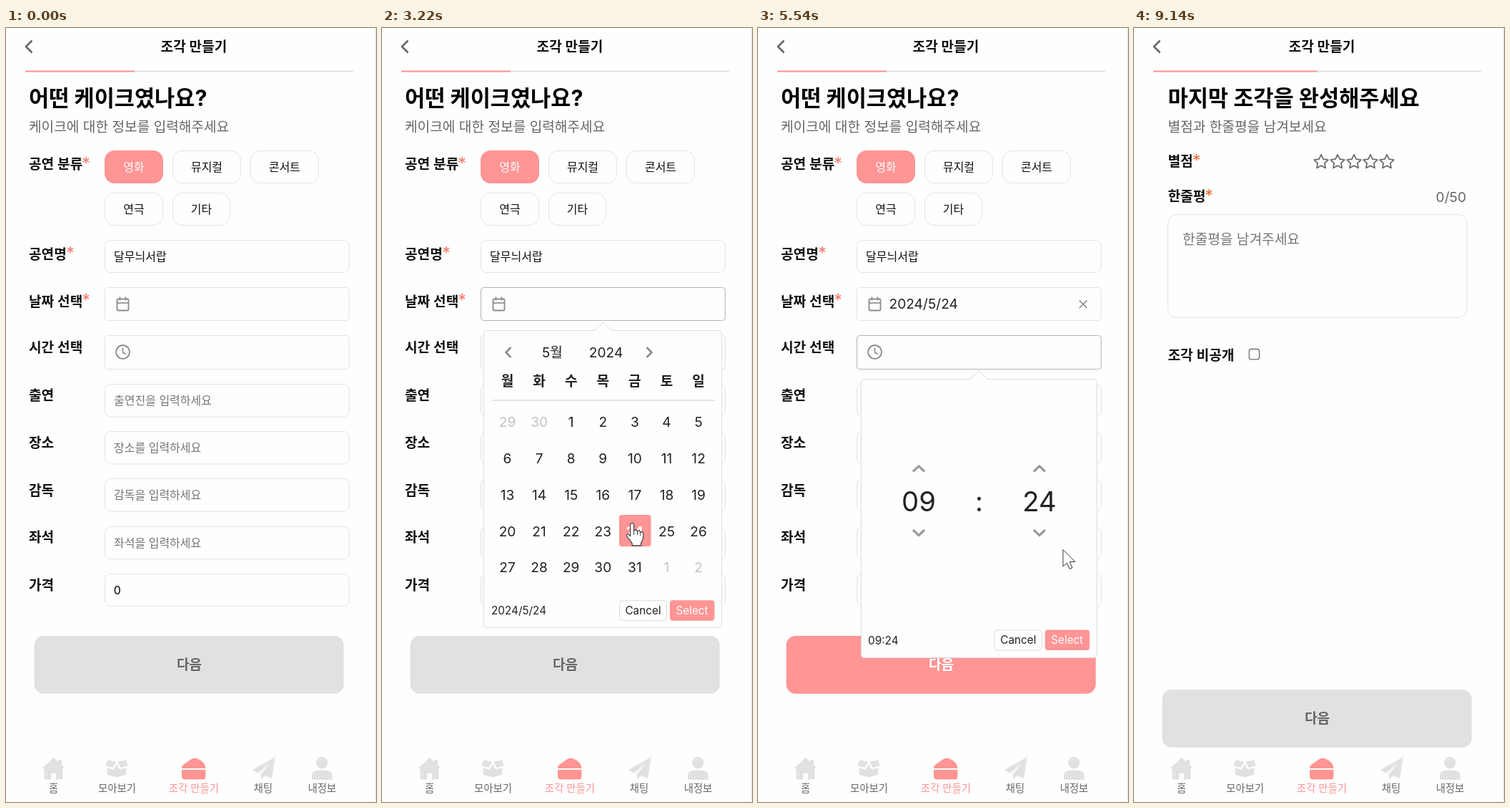
An HTML page with a canvas for the animation above (9210 ms loop, 518 px wide and 1081 px high).

```html
<!DOCTYPE html>
<html lang="ko">
<head>
<meta charset="utf-8">
<title>조각 만들기</title>
<style>
html, body { margin: 0; width: 100%; height: 100%; overflow: hidden; background: #fdfefe; }
canvas { display: block; width: 518px; height: 1081px; }
</style>
</head>
<body>
<canvas id="stage"></canvas>
<script>
const W = 518, H = 1081, LOOP = 9210;
const BG = '#fdfefe', PINK = '#ff9594', LINE = '#e2e4e4', GREY = '#e1e1e1', MID = '#666', ICON = '#8c8c8c', INK = '#111';
const FONT = "Inter, 'Noto Sans CJK KR', 'Noto Sans CJK', sans-serif";
const TITLE = 30.6, BODY = 19.15, FIELD = 16, SMALL = 15.3, TAB = 14.4;
const canvas = document.getElementById('stage');
const c = canvas.getContext('2d');
const dpr = window.devicePixelRatio || 1;
canvas.width = W * dpr;
canvas.height = H * dpr;

const clamp = v => Math.max(0, Math.min(1, v));
const easeOut = p => 1 - (1 - p) ** 2;
const smooth = p => p * p * (3 - 2 * p);
const ramp = (t, start, span) => clamp((t - start) / span);
const mix = (a, b, p) => `rgb(${a.map((v, i) => Math.round(v + (b[i] - v) * p))})`;

// y is the visual middle of the glyphs
function text(s, x, y, size, { color = INK, weight = 400, align = 'left' } = {}) {
  c.font = `${weight} ${size}px ${FONT}`;
  c.textAlign = align;
  c.fillStyle = color;
  c.fillText(s, x, y + 0.36 * size);
}

function box(x, y, w, h, r, fill, stroke, width = 1) {
  c.beginPath();
  c.roundRect(x, y, w, h, r);
  if (fill) { c.fillStyle = fill; c.fill(); }
  if (stroke) { c.strokeStyle = stroke; c.lineWidth = width; c.stroke(); }
}

function line(points, color, width) {
  c.beginPath();
  points.forEach(([x, y]) => c.lineTo(x, y));
  c.strokeStyle = color;
  c.lineWidth = width;
  c.stroke();
}

function shape(d, fill, stroke, width = 1) {
  const p = new Path2D(d);
  if (fill) { c.fillStyle = fill; c.fill(p); }
  if (stroke) { c.strokeStyle = stroke; c.lineWidth = width; c.stroke(p); }
}

function star(x, y) {
  c.beginPath();
  for (let i = 0; i < 10; i++) {
    const a = -Math.PI / 2 + i * Math.PI / 5, r = i % 2 ? 5.1 : 10.3;
    c.lineTo(x + r * Math.cos(a), y + r * Math.sin(a));
  }
  c.closePath();
  c.strokeStyle = MID;
  c.lineWidth = 1.7;
  c.stroke();
}

const required = (x, y, color) => text('*', x, y + 3.9, 23, { color, align: 'center' });
const label = (s, x, y) => text(s, x, y, BODY, { weight: 600 });

function header(progress) {
  line([[36.5, 17.5], [28, 26], [36.5, 34.5]], MID, 2.5);
  text('조각 만들기', 263, 26, BODY, { weight: 600, align: 'center' });
  c.fillStyle = '#dfe2e1';
  c.fillRect(27, 59.5, 459, 2);
  c.fillStyle = PINK;
  c.fillRect(27, 59.5, progress, 2);
}

function heading(title, sub, x) {
  text(title, x, 98, TITLE, { weight: 700, color: '#000' });
  text(sub, x, 138, BODY, { color: MID });
}

function nextButton(y, on) {
  box(39.6, y, 433.2, 80.8, 13, on ? PINK : GREY);
  text('다음', 256.5, y + 40, BODY, { weight: 600, color: on ? '#fff' : MID, align: 'center' });
}

function nav() {
  shape('M66.5 1019 L73.5 1025.2 V1022 H78 V1029.3 L83.5 1034.5 H79.5 V1047 Q79.5 1049.5 77 1049.5 H70 V1041 H63 V1049.5 H56 Q53.5 1049.5 53.5 1047 V1034.5 H50 Z', GREY);
  shape('M142 1022.5 L154 1024.5 L149.5 1033 L139 1030.5 Z M168 1022.5 L156 1024.5 L160.5 1033 L171 1030.5 Z M142 1033.5 L151 1035.5 L155 1028 L159 1035.5 L168 1033.5 V1043 L155 1046.5 L142 1043 Z', GREY);
  shape('M246 1034 Q246 1030.5 249 1028.5 L260 1020.8 Q264 1018.5 269 1021 Q279 1025.5 279.5 1034 Z M246 1036 H279.5 V1045 Q279.5 1049.5 275 1049.5 H250.5 Q246 1049.5 246 1045 Z', PINK);
  shape('M377 1018 L344.5 1036.5 L353.5 1040.5 L370.5 1025 L357 1042 V1050 L362 1044.5 L372 1048 Z', GREY);
  shape('M450.5 1026.3 A8.2 8.2 0 1 1 434.1 1026.3 A8.2 8.2 0 1 1 450.5 1026.3 Z M428 1050 V1046 Q428 1037 437 1037 H448 Q457 1037 457 1046 V1050 Z', GREY);
  [['홈', 66.5], ['모아보기', 155.5], ['조각 만들기', 263], ['채팅', 360], ['내정보', 442.5]].forEach(([s, x], i) =>
    text(s, x, 1062, TAB, { weight: 500, color: i === 2 ? PINK : MID, align: 'center' }));
}

const chips = [['영화', 138, 171, 82], ['뮤지컬', 233, 171, 96], ['콘서트', 342, 171, 96], ['연극', 138, 230, 82], ['기타', 233, 230, 81]];
const picks = [[-1000, 0], [780, 1], [1350, 2], [1840, 0]];

function chipLevel(i, t) {
  let level = 0;
  for (const [at, id] of picks) {
    if (t < at) break;
    const p = easeOut(ramp(t, at, 300));
    level += ((id === i ? 1 : 0) - level) * p;
  }
  return level;
}

function drawChips(t) {
  chips.forEach(([s, x, y, w], i) => {
    const k = chipLevel(i, t);
    box(x + .5, y + .5, w - 1, 45, 13, mix([253, 254, 254], [255, 149, 148], k), mix([226, 228, 228], [255, 149, 148], k));
    text(s, x + w / 2, y + 23.5, FIELD, { color: mix([17, 17, 17], [255, 255, 255], k), align: 'center' });
  });
}

function clearMark(y) {
  line([[450, y - 5.5], [460.5, y + 5]], ICON, 1.7);
  line([[460.5, y - 5.5], [450, y + 5]], ICON, 1.7);
}

function priceField(t) {
  const focus = t >= 6680 && t < 8400;
  const digits = Math.floor((t - 7000) / 90) + 1;
  const value = digits < 1 ? '0' : '10000'.slice(0, digits);
  box(138.5, 762.5, 342, 45, 8, null, focus ? null : LINE);
  if (focus) {
    shape('M481 761.5 H146 Q137.5 761.5 137.5 770 V800 Q137.5 808.5 146 808.5 H481', null, PINK, 1.2);
    box(459, 775, 17.5, 20.5, 0, '#efefef');
    shape('M463 783 L468 778 L473 783 Z M463 787 L468 792 L473 787 Z', '#505050');
  }
  text(value, 150.8, 785, FIELD, { color: '#000' });
}

function form(t) {
  header(153);
  heading('어떤 케이크였나요?', '케이크에 대한 정보를 입력해주세요', 32);
  [['공연 분류', 190], ['공연명', 316], ['날짜 선택', 382], ['시간 선택', 446], ['출연', 513], ['장소', 579], ['감독', 646], ['좌석', 711], ['가격', 778]]
    .forEach(([s, y]) => label(s, 32, y));
  [[112, 185], [90, 310], [112, 376]].forEach(([x, y]) => required(x, y, '#f9776a'));
  drawChips(t);

  box(138.5, 296.5, 342, 45, 8, null, LINE);
  text('달무늬서랍', 151, 319, FIELD);

  box(138.5, 362.5, 342, 46, 4, null, t >= 2330 && t < 4600 ? '#b3b5b5' : LINE);
  box(155.5, 378.5, 16, 16, 2, null, ICON, 1.8);
  line([[155, 384], [172, 384]], ICON, 1.7);
  line([[159.5, 375.5], [159.5, 380.5]], ICON, 1.8);
  line([[167.5, 375.5], [167.5, 380.5]], ICON, 1.8);
  if (t >= 4510) {
    text('2024/5/24', 183.5, 385.5, BODY, { color: '#222' });
    clearMark(386);
  }

  box(138.5, 429.5, 342, 47, 4, null, t >= 5150 && t < 6250 ? '#b3b5b5' : LINE);
  c.beginPath();
  c.arc(163.5, 452.5, 9.5, 0, 7);
  c.strokeStyle = ICON;
  c.lineWidth = 1.9;
  c.stroke();
  line([[163.5, 446.5], [163.5, 453], [168, 455.5]], ICON, 1.7);
  if (t >= 6200) {
    text('09:24', 183.5, 453, BODY, { color: '#222' });
    clearMark(454);
  }

  [['출연진을', 497.5], ['장소를', 563.5], ['감독을', 629.5], ['좌석을', 696.5]].forEach(([s, y]) => {
    box(138.5, y, 342, 45.5, 8, null, LINE);
    text(s + ' 입력하세요', 151, y + 22.8, FIELD, { color: '#757575' });
  });
  priceField(t);
  nextButton(849, t >= 4510);
  nav();
  popup(t, 2560, 4520, calendar);
  popup(t, 5220, 6200, clock);
}

function popup(t, open, close, draw) {
  const a = ramp(t, open, 140) * (1 - ramp(t, close, 140));
  if (!a) return;
  c.save();
  c.globalAlpha = a;
  draw();
  c.restore();
}

function panel(x, y, w, h) {
  box(x, y, w, h, 4, BG, '#dcdede');
  shape(`M297 ${y + 1} L309.5 ${y - 11} L322 ${y + 1}`, BG);
  shape(`M297 ${y} L309.5 ${y - 11} L322 ${y}`, null, '#dcdede');
}

function footer(s, x, right, y) {
  text(s, x, y, SMALL, { color: '#222' });
  box(right - 133, y - 14, 66, 28, 4, null, '#dcdede');
  text('Cancel', right - 100, y - .5, SMALL, { color: '#222', align: 'center' });
  box(right - 62.5, y - 14.5, 62.5, 28.5, 4, PINK);
  text('Select', right - 31.5, y - .5, SMALL, { color: '#fff', align: 'center' });
}

function calendar() {
  panel(142.5, 422.5, 333, 415);
  line([[180.5, 446], [173.5, 453], [180.5, 460]], ICON, 2.6);
  line([[370.5, 446], [377.5, 453], [370.5, 460]], ICON, 2.6);
  text('5월', 238.5, 453, BODY, { color: '#222', align: 'center' });
  text('2024', 313.5, 453, BODY, { color: '#222', align: 'center' });
  const col = i => 175.5 + i * 44.6;
  [...'월화수목금토일'].forEach((s, i) => text(s, col(i), 493, BODY, { weight: 600, color: '#222', align: 'center' }));
  line([[154, 520], [466, 520]], '#dcd9da', 1.6);
  box(332, 680, 44.6, 44.2, 4, PINK);
  for (let i = 0; i < 35; i++) {
    const day = i - 1, inside = day > 0 && day < 32, chosen = day === 24;
    text(String(day < 1 ? day + 30 : inside ? day : day - 31), col(i % 7), 550 + 50.9 * Math.floor(i / 7), BODY, {
      color: chosen ? '#fff' : inside ? '#222' : '#c0c2c5', weight: chosen ? 700 : 400, align: 'center'
    });
  }
  footer('2024/5/24', 153, 465.5, 813.7);
}

function clock() {
  panel(144.5, 490.5, 330, 389);
  for (const x of [225, 394]) {
    line([[x - 8, 619.5], [x, 611.8], [x + 8, 619.5]], '#9a9a9a', 3.2);
    line([[x - 8, 701], [x, 708.7], [x + 8, 701]], '#9a9a9a', 3.2);
  }
  [['09', 225], [':', 309.5], ['24', 394]].forEach(([s, x]) => text(s, x, 661, 2 * BODY, { color: '#222', align: 'center' }));
  footer('09:24', 154, 464.3, 855);
}

function review(t) {
  header(153 + 76.5 * smooth(ramp(t, 8500, 520)));
  heading('마지막 조각을 완성해주세요', '별점과 한줄평을 남겨보세요', 47.5);
  label('별점', 47.5, 186);
  required(87.5, 181, '#ea6a3c');
  for (let i = 0; i < 5; i++) star(262 + 23 * i, 187.2);
  label('한줄평', 47.5, 235);
  required(105, 230, '#ea6a3c');
  text('0/50', 465, 236, BODY, { color: MID, align: 'right' });
  box(47.5, 260.5, 418.5, 144, 12, null, LINE);
  text('한줄평을 남겨주세요', 68, 295, BODY, { color: '#757575' });
  label('조각 비공개', 47.5, 457);
  box(161.2, 448.5, 14.3, 14.3, 3, '#fff', '#707070', 1.3);
  nextButton(924, false);
  nav();
}

// time, x, y, pointer kind until the next point
const path = [
  [90, 345, 700, 'beam'], [300, 343, 640, 'beam'], [420, 341, 500, 'arrow'], [560, 338, 340, 'arrow'],
  [680, 322, 215, 'hand'], [850, 324, 200, 'hand'], [1000, 327, 189, 'hand'], [1150, 350, 176, 'hand'],
  [1330, 392, 194, 'hand'], [1500, 390, 198, 'hand'], [1780, 197, 200, 'hand'], [1900, 198, 206, 'hand'],
  [2020, 207, 256, 'hand'], [2070, 212, 300, 'beam'], [2120, 216, 343, 'beam'], [2300, 228, 392, 'beam'],
  [2420, 232, 402, 'beam'], [2560, 240, 385, 'arrow'], [2750, 290, 460, 'hand'], [3200, 350, 690, 'hand'],
  [3520, 353, 704, 'hand'], [3900, 356, 707, 'hand'], [4250, 430, 812, 'hand'], [4440, 441, 821, 'hand'],
  [4600, 441, 820, 'arrow'], [4800, 400, 640, 'arrow'], [5000, 340, 456, 'beam'], [5220, 340, 454, 'arrow'],
  [5400, 410, 650, 'arrow'], [5540, 427, 728, 'arrow'], [5740, 431, 845, 'hand'], [6000, 435, 860, 'hand'],
  [6220, 434, 857, 'arrow'], [6440, 410, 790, 'beam'], [6680, 220, 786, 'beam'], [6900, 25, 786, 'beam'],
  [7250, 25, 788, 'beam'], [7420, 72, 799, 'arrow'], [7520, 150, 930, 'arrow'], [7600, 238, 1058, 'hand'],
  [7620, 240, 1062, 'hand'], [7760, 262, 1020, 'arrow'], [7980, 300, 920, 'hand'], [8120, 303, 905, 'hand'],
  [8500, 303, 905, 'arrow'], [9090, 303, 905, 'arrow']
];

const pointers = {
  hand() {
    shape('M-2.5 2.2 Q0 -1.5 2.5 2.2 V11 Q6 8.5 7.3 11.8 Q10.2 10 11.6 13 Q15.5 11.8 15.7 16 Q15.7 24 12.5 28 V32 H0 V29 Q-3 23.5 -7.2 19.5 Q-8.6 15.5 -5.2 16 L-2.5 19 Z', '#fff', '#333', 1.1);
    shape('M2.5 11 V17 M7.3 12 V17 M11.6 13 V18', null, '#333', 1);
  },
  arrow() {
    shape('M0 0 V23.5 L5.5 18.5 L9.3 27 L13 25.3 L9.3 17 H17 Z', '#fff', '#333', 1);
  },
  beam() {
    shape('M-7 -12 H-2 Q0 -12 0 -10 Q0 -12 2 -12 H7 M0 -11 V11 M-7 12 H-2 Q0 12 0 10 Q0 12 2 12 H7', null, '#111', 2);
  }
};

function pointer(t) {
  const i = path.findIndex(([at], n) => t >= at && n + 1 < path.length && t < path[n + 1][0]);
  if (i < 0) return;
  const [t0, x0, y0, kind] = path[i], [t1, x1, y1] = path[i + 1];
  const p = (t - t0) / (t1 - t0);
  c.save();
  c.translate(x0 + (x1 - x0) * p, y0 + (y1 - y0) * p);
  pointers[kind]();
  c.restore();
}

function draw(t) {
  c.setTransform(dpr, 0, 0, dpr, 0, 0);
  c.lineJoin = 'round';
  c.fillStyle = BG;
  c.fillRect(0, 0, W, H);
  c.fillStyle = '#e8eaea';
  c.fillRect(517, 0, 1, H);
  (t < 8500 ? form : review)(t);
  pointer(t);
}

const start = performance.now();
function tick() {
  draw((performance.now() - start) % LOOP);
  requestAnimationFrame(tick);
}
tick();
</script>
</body>
</html>
```
